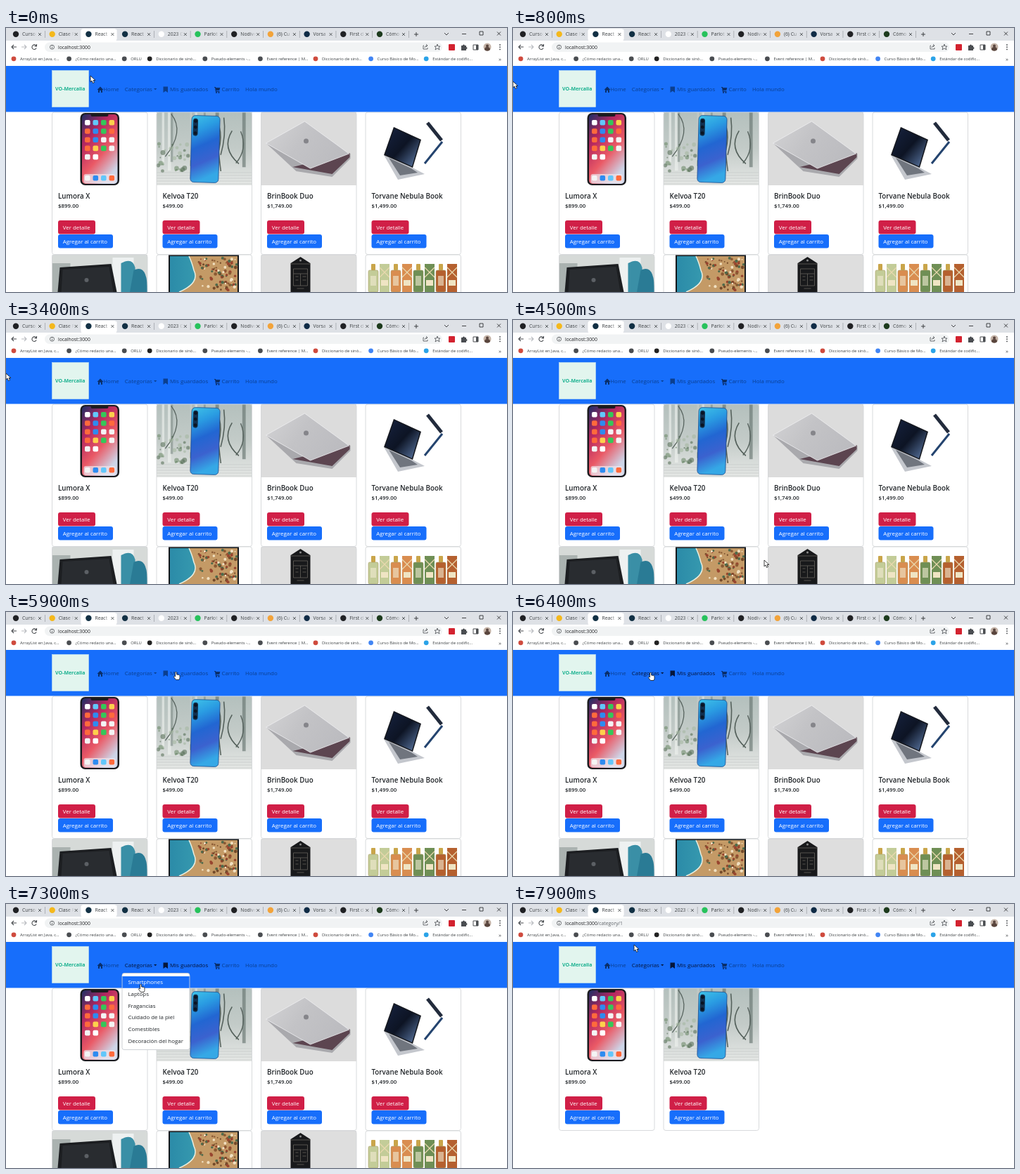
Write an HTML page that moves like this. It is 712x376 px and loops after 8000 ms.

```html
<!DOCTYPE html>
<html lang="es">
<head>
<meta charset="utf-8">
<title>Tienda</title>
<style>
html, body { margin: 0; width: 100%; height: 100%; overflow: hidden; background: #fff; }
svg { display: block; width: 712px; height: 376px; }
text { font-family: "Open Sans", "Noto Sans", sans-serif; white-space: pre; }
</style>
</head>
<body>
<svg id="stage" viewBox="0 0 712 376" xmlns="http://www.w3.org/2000/svg"></svg>
<script>
const BLUE = '#176efb', INK = '#212529', GREY = '#4a4d51', NAV = '#0b3f8f', NAV_DARK = '#06163a';

// Drawing helpers
const rect = (x, y, w, h, fill, r = 0, more = '') =>
  `<rect x="${x}" y="${y}" width="${w}" height="${h}" rx="${r}" fill="${fill}" ${more}/>`;
const dot = (x, y, r, fill, more = '') => `<circle cx="${x}" cy="${y}" r="${r}" fill="${fill}" ${more}/>`;
const shape = (d, fill, more = '') => `<path d="${d}" fill="${fill}" ${more}/>`;
const line = (d, color = GREY, w = 1) => shape(d, 'none', `stroke="${color}" stroke-width="${w}"`);
const text = (x, y, s, size, fill = INK, more = '') =>
  `<text x="${x}" y="${y}" font-size="${size}" fill="${fill}" ${more}>${s}</text>`;
const group = (id, body) => `<g id="${id}">${body}</g>`;
const at = (x, y, body) => `<g transform="translate(${x} ${y})">${body}</g>`;
const times = (n, f) => Array.from({ length: n }, (_, i) => f(i)).join('');
const grad = (id, stops, x2, y2) => `<linearGradient id="${id}" x2="${x2}" y2="${y2}">` +
  stops.map((c, i) => `<stop offset="${i / (stops.length - 1)}" stop-color="${c}"/>`).join('') + '</linearGradient>';

let seed = 7;
const rnd = (lo, hi) => lo + (hi - lo) * ((seed = seed * 16807 % 2147483647) / 2147483647);
const pick = list => list[Math.floor(rnd(0, list.length))];

// Browser window
const TABS = ['Curso', 'Clase F', 'React', 'React', '2023 C', 'Parlot', 'Nodive', '(6) Cu', 'Vorsa', 'First d', 'Cómo'];
const TAB_MARKS = ['#202124', '#f4b81c', '#123044', '#123044', '#fff', '#27c25c', '#202124', '#f2a33a', '#0f2b46', '#202124', '#1d3b1d'];

function tab(name, i) {
  const x = 14 + i * 51.7, active = i === 2;
  return (active ? rect(x - 11, 1, 51, 18, '#fff', 4) : '') +
    dot(x, 8.8, 4.2, TAB_MARKS[i]) + text(x + 9, 11.2, name, 6.9, '#3c4043') +
    rect(x + 22, 2, 8, 14, `url(#${active ? 'fadeOn' : 'fadeOff'})`) +
    rect(x + 30, 2, 10, 14, active ? '#fff' : '#dee1e6') +
    line(`M${x + 32} 7l4 4m0-4l-4 4`, '#3c4043', .8) +
    (i === 1 || active ? '' : rect(x + 41, 4, .7, 10, '#9a9da2'));
}

const tabs = () => rect(0, 0, 712, 18, '#dee1e6') + TABS.map(tab).join('') +
  line('M580 9h6m-3-3v6M623 7l3 3l3-3M648 8.500h6M673 5h5v5h-5zM698 5.500l5 5m0-5l-5 5', '#303134', .9);

const BOOKMARKS = ['ArrayList en Java, c...', '¿Cómo redacto una...', 'ORLU', 'Diccionario de sinó...', 'Pseudo-elements -...',
  'Event reference | M...', 'Diccionario de sinó...', 'Curso Básico de Mo...', 'Estándar de codific...'];
const BOOKMARK_MARKS = ['#cf4b3e', GREY, GREY, '#222', GREY, GREY, '#cf4b3e', '#4285f4', '#2ba3e8'];

function bookmarks() {
  let x = 11;
  return BOOKMARKS.map((name, i) => {
    const s = dot(x, 43.8, 3.4, BOOKMARK_MARKS[i]) + text(x + 9, 46, name, 5.9, '#3c4043');
    x += name.length > 6 ? 78.6 : 36;
    return s;
  }).join('') + text(700, 46.5, '»', 8, GREY);
}

const toolbar = () => rect(0, 18, 712, 36, '#fff') + rect(55, 20.5, 565, 13.5, '#f1f3f4', 6.7) +
  line('M15 27H8m3-3l-3 3l3 3M43 25.400a3.300 3.300 0 1 0 .2 3.200M43.500 23v3h-3', GREY, 1.1) +
  line('M22 27h7m-3-3l3 3l-3 3', '#b9bcc0', 1.1) +
  line('M65.500 27v2M65.500 25v1M594 25h-1v5h6v-2M595 28q.5-3 4-3m-2-2l2 2l-2 2', GREY, .8) +
  dot(65.5, 27.2, 3, 'none', `stroke="${GREY}" stroke-width=".8"`) +
  text(74, 29.7, 'localhost:3000<tspan id="path" fill="#5f6368">/category/1</tspan>', 6.8, '#202124') +
  line('M613 23l1 3h3l-2 2l1 3l-3-2l-3 2l1-3l-2-2h3z', GREY, .8) +
  rect(629, 23, 9, 9, '#d3222f', 1) +
  shape('M647 25h2a1.500 1.500 0 1 1 3 0h2v2a1.500 1.500 0 1 1 0 3v2h-7z', GREY) +
  line('M664 24h7v7h-7z') + rect(668, 24, 3, 7, GREY) +
  dot(684, 27, 5.5, '#c5b4a8') + dot(684, 25.5, 2, '#59453d') + shape('M680 31a4 4 0 0 1 8 0a5.500 5.500 0 0 1-8 0', '#59453d') +
  times(3, i => dot(702, 24 + i * 3.2, .9, GREY)) + bookmarks();

// Page header
const navbar = () => rect(0, 54, 712, 65.5, BLUE) +
  rect(65.5, 60.5, 52, 52, '#e2f5ee', 0, 'stroke="#c5e3f0" stroke-width=".6"') +
  text(91.3, 89.2, 'VO-Mercalia', 7, '#18b18f', 'font-weight="700" text-anchor="middle"') +
  shape('M129.500 88l4.500-4.500l4.500 4.500h-1.500v4h-2v-3h-2v3h-2v-4z', '#0a2f6b') +
  shape('M296 84h2l.3 1h6l-1 4h-4.500l.2 1h4.500v1h-5.500l-1-6h-1z', '#0a2f6b') +
  dot(299, 92, 1, '#0a2f6b') + dot(302.5, 92, 1, '#0a2f6b') +
  text(138.3, 90.2, 'Home', 7.9, NAV) +
  group('cat', text(168.8, 90.2, 'Categorías', 7.9, 'inherit') + '<path d="M210 86h4.400l-2.200 2.300z"/>') +
  group('saved', '<path d="M223.500 83.500h6.500v8.500l-3.200-2.200l-3.300 2.200z"/>' + text(233, 90.2, 'Mis guardados', 7.9, 'inherit')) +
  text(306.5, 90.2, 'Carrito', 7.9, NAV) + text(340, 90.2, 'Hola mundo', 7.9, NAV);

// Product pictures, each 135 wide, drawn from the card's corner
const ICONS = ['#fff', '#fdd04c', '#35c759', '#2e8bf0', '#f4f4f4', '#ff6a3c', '#62c7fa'];

const phone = () => rect(40, 1, 55.5, 103, '#1b1b1f', 7) + rect(42.5, 3, 50.5, 99, 'url(#wall)', 5) +
  rect(55, 2, 25, 4, '#1b1b1f', 2) + rect(45, 88, 45.5, 13, '#f0e4ec', 3, 'opacity=".7"') +
  times(24, i => i > 17 && i < 20 ? '' : rect(46.5 + i % 4 * 11.5, 11 + Math.floor(i / 4) * 12.2 + (i > 19 ? 18 : 0), 7.6, 7.6, pick(ICONS), 2));

const bluePhone = () => rect(0, 0, 135.5, 104, 'url(#yard)') +
  times(10, i => rect(rnd(0, 130), 0, rnd(2, 7), rnd(60, 85), pick(['#e8ecea', '#7f8c88', '#f1f3f1', '#5f6e69']), 0, 'opacity=".6"')) +
  times(7, () => line(`M${rnd(0, 135)} ${rnd(0, 30)}q${rnd(-20, 20)} 25 ${rnd(-15, 15)} ${rnd(45, 70)}`, '#55615c', rnd(1, 2.5))) +
  times(34, () => dot(rnd(0, 45), rnd(45, 85), rnd(1, 3.5), pick(['#6e8b6b', '#a5b8a2', '#587059']), 'opacity=".6"')) +
  times(5, i => line(`M0 ${86 + i * 4}h135`, '#c3c8c6', .7)) +
  '<g transform="rotate(1.500 69 52)">' + rect(49, 5, 40, 95, 'url(#aura)', 5, 'stroke="#1c4c8c" stroke-width=".8"') +
  rect(51, 9, 7, 25, '#11304f', 3.5) + times(3, i => dot(54.5, 13 + i * 8.5, 2.4, '#0a1422')) + '</g>';

const silverLaptop = () => rect(0, 0, 135.5, 104, '#dcdcdc') +
  shape('M8 45L50 84L101 92L127 66V59z', '#a9a9ad') + shape('M45 78L101 88L126 64V58z', '#5c4550') +
  shape('M7 44L62 13L125 59L70 80z', 'url(#silver)', 'stroke="#efeff1" stroke-width=".8"') + dot(64, 41, 3.5, '#85858a');

const thinLaptops = () => shape('M26 61L67 79L84 88L46 96z', '#c4c7cd') + shape('M33 65L65 80L74 86L49 90z', '#70757e') +
  shape('M40 21L79 39L67 79L26 61z', '#15181f') + shape('M41 23L77 40L66 77L28 60z', 'url(#night)') +
  line('M88 15L108 40', '#222b3c', 5) + line('M109 42L84 73', '#24446f', 3);

const desk = () => rect(0, 0, 135.5, 53, '#d6dad8') + rect(0, 12, 26, 41, '#aab2b0') + rect(86, 4, 30, 49, '#eef1f1') +
  shape('M98 12q16-9 20 6l2 35h-22z', '#3a8fa6') + shape('M116 22q20-10 19.500 31h-25z', '#2a7b95') +
  shape('M11 18L84 13L92 53H8z', '#1c1e21') + shape('M15 21L81 17L87 53H13z', '#292c30') + dot(49, 36, 3, '#5c6065');

const beach = () => rect(17, 0, 100, 53, '#15181b') + rect(19, 2, 96, 51, 'url(#sea)') +
  shape('M46 2H115V53H32Q62 40 53 22Q50 10 46 2z', '#c49a66') + line('M46 2Q50 10 53 22Q62 40 32 53', '#e8efe2', 1.5) +
  times(90, () => dot(rnd(60, 114), rnd(4, 52), rnd(.8, 2.4), pick(['#744a2a', '#f0dfc0', '#4f6a4c', '#98452f', '#8a5a34'])));

const blackBox = () => rect(0, 0, 135.5, 53, '#dedede') + shape('M42 12L56 3L70 12V53H42z', '#18191b') + dot(56, 8, 1.5, '#8b8b8b') +
  line('M42 13h28M46 20h20v24h-20zM46 27h20M56 27v17M49 31h4M59 31h5M59 36h5M49 36h4M51 48h10', '#6d6a63', .7);

const perfumes = () => ['#c3cc98', '#d98d50', '#6f8f55', '#b5602f'].map((c, i) => at(4 + i * 32, 0,
  rect(4, 13, 6, 9, '#c9a54a', 1) + rect(0, 22, 14, 31, c, 2, 'stroke="#a99a64" stroke-width=".6"') + rect(3, 30, 8, 14, '#f2ecd2', 0, 'opacity=".6"') +
  rect(16, 13, 14, 40, c) + line('M16 18l14 14m0-14l-14 14', '#ead9ae', 1.2) + rect(18, 36, 10, 8, '#efe4c3'))).join('');

// Cards
const column = i => 65.5 + i * 148.5;
const frame = h => rect(0, 0, 135.5, h, 'none', 3, 'stroke="#d4d6d9" stroke-width=".9"');
const button = (y, w, color, s) => rect(8.5, y, w, 19.5, color, 3) + text(15.2, y + 12.9, s, 7.9, '#fff');
const card = (i, name, price, art) => at(column(i), 120, art() + frame(202.5) +
  text(8.5, 123.2, name, 9.8, INK, 'font-weight="600"') + text(8.5, 135.8, price, 7.9, INK, 'font-weight="600"') +
  button(154, 53, '#d01f47', 'Ver detalle') + button(174, 78, BLUE, 'Agregar al carrito'));
const lowerRow = () => [desk, beach, blackBox, perfumes].map((art, i) => at(column(i), 323, art() + frame(60))).join('');

// Category menu
const ITEMS = ['Smartphones', 'Laptops', 'Fragancias', 'Cuidado de la piel', 'Comestibles', 'Decoración del hogar'];
const ROW = 16.75, MENU_TOP = 103;
const menu = () => rect(165, 98.5, 96, 109, '#fff', 3, 'stroke="#c3c7cc" stroke-width=".8"') +
  `<rect id="bar" x="165.400" width="95.200" height="${ROW}"/>` +
  ITEMS.map((s, i) => text(173.5, 114.2 + i * ROW, s, 7.9, INK, `id="item${i}"`)).join('');

const OUTLINE = 'stroke="#111" stroke-width=".8"';
const cursor = () => group('arrow', shape('M0 0v9l2-2l1.500 3.500l2-1l-1.500-3h3z', '#fff', OUTLINE)) +
  group('hand', shape('M-1.500 7V1q1-2 2 0v3q4 0 4.500 1.500v3q0 1-1 3h-4.500l-3-4q0-1.500 1-1z', '#fff', OUTLINE));

document.getElementById('stage').innerHTML = '<defs>' +
  grad('wall', ['#1d2f66', '#b3265f', '#ea5a66', '#cdd5e8'], .6, 1) + grad('aura', ['#3fc3e8', '#2a9ce2', '#2266d2', '#3b62cf', '#35a8e6'], .2, 1) +
  grad('yard', ['#b4c0bd', '#c3cbc8', '#e6e8e6'], 0, 1) + grad('silver', ['#d3d3d5', '#c3c3c6', '#bcbcc0'], 1, .4) +
  grad('night', ['#16223f', '#0d1424', '#5f7dab'], 1, 1) + grad('sea', ['#2b8ba8', '#48b0ba'], 1, 0) +
  grad('fadeOn', ['#ffffff00', '#fff'], 1, 0) + grad('fadeOff', ['#dee1e600', '#dee1e6'], 1, 0) + '</defs>' +
  rect(0, 0, 712, 376, '#fff') +
  card(0, 'Lumora X', '$899.00', phone) + card(1, 'Kelvoa T20', '$499.00', bluePhone) +
  group('rest', card(2, 'BrinBook Duo', '$1,749.00', silverLaptop) + card(3, 'Torvane Nebula Book', '$1,499.00', thinLaptops) + lowerRow()) +
  tabs() + toolbar() + navbar() + group('menu', menu()) + group('cursor', cursor());

// Motion: the pointer rests between moves
const LOOP = 8000, STEP = 100;
const OPEN = 6500, PRESS = 7300, LEAVE = 7500;
const START = { x: 120, y: 68 };
const move = (from, to, x, y) => ({ from, to, x, y });
const MOVES = [
  move(100, 800, 0, 76), move(4200, 4500, 357, 342), move(4800, 5100, 325, 358), move(5300, 5500, 290, 358),
  move(5700, 5900, 242, 85), move(6000, 6400, 196, 86), move(6600, 6700, 196, 178), move(6800, 6800, 194, 124),
  move(7000, 7100, 192, 114), move(LEAVE, 7900, 172, 58)];

const ease = k => k * k * (3 - 2 * k);

function pointer(t) {
  let { x, y } = START;
  for (const m of MOVES) {
    if (t < m.from) break;
    const k = ease(Math.min(1, (t - m.from + STEP) / (m.to - m.from + STEP)));
    x += (m.x - x) * k;
    y += (m.y - y) * k;
  }
  return [x, y];
}

const el = id => document.getElementById(id);
const show = (id, on) => el(id).setAttribute('display', on ? 'inline' : 'none');
const fill = (id, color) => el(id).setAttribute('fill', color);

function draw(ms) {
  const t = Math.floor(ms % LOOP / STEP) * STEP;
  const [x, y] = pointer(t);
  const left = t >= LEAVE, hand = t >= 5900 && !left, pressed = t >= PRESS;
  const row = Math.floor((y - MENU_TOP) / ROW);
  el('cursor').setAttribute('transform', `translate(${x} ${y})`);
  show('hand', hand);
  show('arrow', !hand);
  show('menu', t >= OPEN && !left);
  show('rest', !left);
  show('path', left);
  fill('saved', t >= 6000 ? NAV_DARK : NAV);
  fill('cat', t >= 6300 ? NAV_DARK : NAV);
  el('bar').setAttribute('y', MENU_TOP + row * ROW);
  fill('bar', row < 0 ? 'none' : pressed ? BLUE : '#e9ecef');
  fill('item0', pressed ? '#fff' : INK);
}

function loop(now) {
  draw(now);
  requestAnimationFrame(loop);
}
draw(0);
requestAnimationFrame(loop);
</script>
</body>
</html>
```
